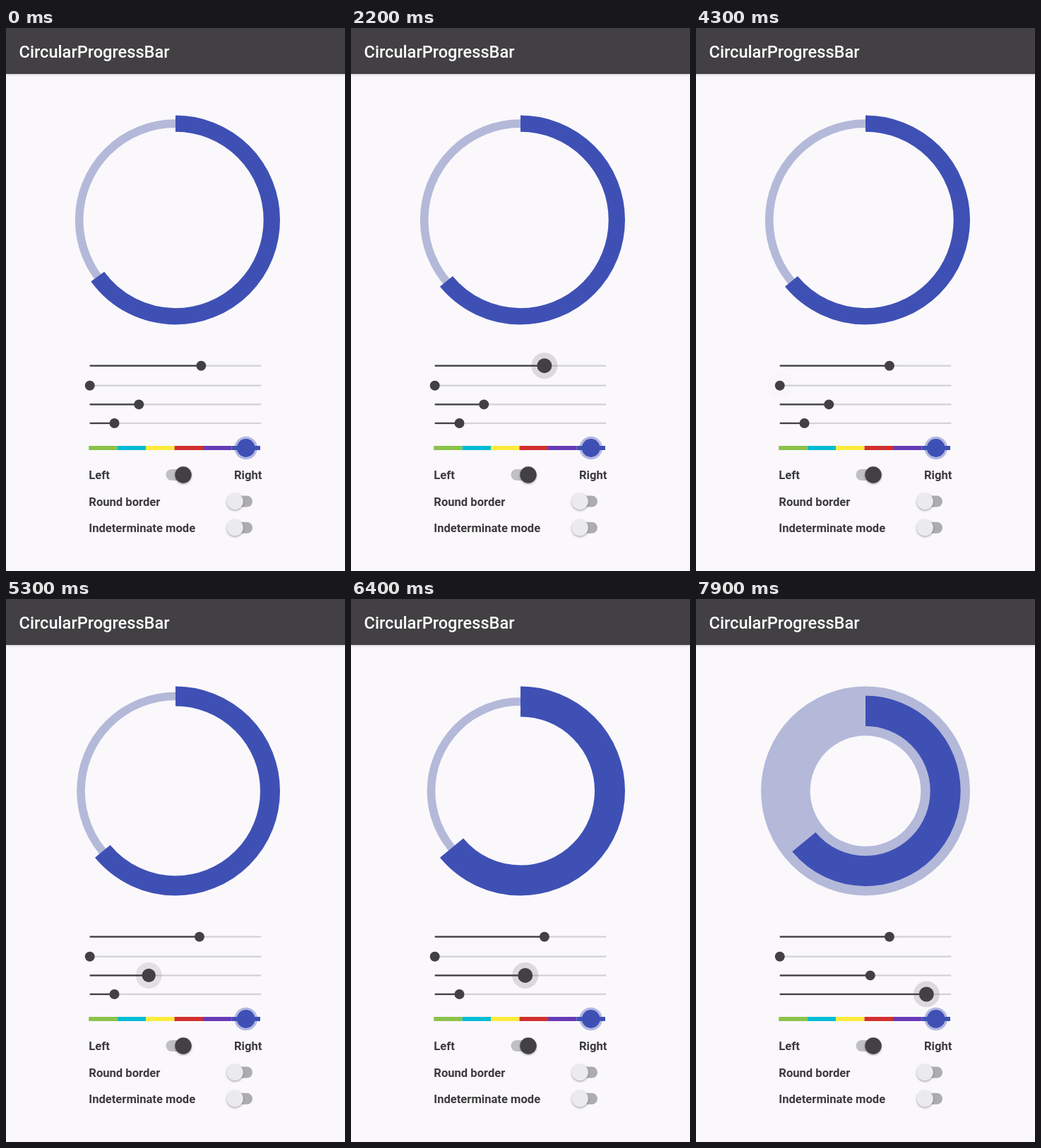
These frames come from a looping animation (480x768 px, 8 s). An HTML page with a canvas:

```html
<!DOCTYPE html>
<html lang="en">
<head>
<meta charset="utf-8">
<title>CircularProgressBar</title>
<style>
  html, body { margin: 0; width: 100%; height: 100%; overflow: hidden; background: #faf8fb; }
  canvas { display: block; }
</style>
</head>
<body>
<canvas id="stage" width="480" height="768"></canvas>
<script>
const ctx = document.getElementById('stage').getContext('2d');
const LOOP = 8000, STEP = 100;
const DARK = '#424043', PAPER = '#faf8fb', BLUE = '#3f50b5', PALE = '#b4b9d9';
const RING = { x: 240, y: 271.5, r: 148 };
const MAX_STROKE = 81.4;
const TRACK = { left: 118.7, width: 242.5 };
const PALETTE = ['#8bc34a', '#00bcd4', '#ffeb3b', '#d32f2f', '#673ab7', BLUE];

// Each drag eases between a few [time, value] turning points.
const sliders = {
  progress: { y: 477.7, down: 900, up: 2300, drag: [[900, .65], [1450, .252], [2200, .64]] },
  start: { y: 505.7, down: 3000, up: 4300, drag: [[3000, 0], [3600, .445], [4100, 0]] },
  barWidth: { y: 532.4, down: 5100, up: 6600, drag: [[5100, .2866], [5900, .68], [6400, .528]] },
  trackWidth: { y: 559, down: 7200, up: LOOP, drag: [[7200, .1435], [7900, .856]] }
};

const ease = u => (1 - Math.cos(Math.PI * u)) / 2;

function valueAt({ drag }, t) {
  const next = drag.findIndex(point => point[0] > t);
  if (next === 0) return drag[0][1];
  if (next < 0) return drag[drag.length - 1][1];
  const [t0, a] = drag[next - 1], [t1, b] = drag[next];
  return a + (b - a) * ease((t - t0) / (t1 - t0));
}

function box(x, y, w, h, color) {
  ctx.fillStyle = color;
  ctx.fillRect(x, y, w, h);
}

function disc(x, y, r, color) {
  ctx.fillStyle = color;
  ctx.beginPath();
  ctx.arc(x, y, r, 0, 2 * Math.PI);
  ctx.fill();
}

function arc(from, turns, r, width, color) {
  const a = (from - .25) * 2 * Math.PI;
  ctx.strokeStyle = color;
  ctx.lineWidth = width;
  ctx.beginPath();
  ctx.arc(RING.x, RING.y, r, a, a + turns * 2 * Math.PI);
  ctx.stroke();
}

function label(text, x, y, font = 'bold 16.6px Roboto, sans-serif', color = '#3c3a3d') {
  ctx.font = font;
  ctx.fillStyle = color;
  ctx.fillText(text, x, y);
}

function withShadow(blur, offset, alpha, paint) {
  ctx.save();
  ctx.shadowColor = `rgba(0,0,0,${alpha})`;
  ctx.shadowBlur = blur;
  ctx.shadowOffsetY = offset;
  paint();
  ctx.restore();
}

function toggle(left, thumbX, y, trackColor, thumbColor) {
  ctx.fillStyle = trackColor;
  ctx.beginPath();
  ctx.roundRect(left, y - 8, 36, 16, 8);
  ctx.fill();
  withShadow(3, 1.2, .35, () => disc(thumbX, y, 11.7, thumbColor));
}

function drawSlider(slider, t) {
  const { y, down, up } = slider;
  const x = TRACK.left + valueAt(slider, t) * TRACK.width;
  const held = t >= down && t < up;
  const press = held ? Math.min(1, (t - down + STEP) / 400) : 0;
  const lingering = t >= up && t < up + 800;
  box(TRACK.left, y - 1.15, TRACK.width, 2.3, '#d3d2d6');
  box(TRACK.left, y - 1.15, x - TRACK.left, 2.3, DARK);
  disc(x, y, 18.5, `rgba(66,64,67,${lingering ? .012 : .17 * press})`);
  disc(x, y, 7 + 3.5 * press, DARK);
}

function drawRing(t) {
  const bar = valueAt(sliders.barWidth, t) * MAX_STROKE;
  const track = valueAt(sliders.trackWidth, t) * MAX_STROKE;
  const r = RING.r - Math.max(bar, track) / 2;
  arc(0, 1, r, track, PALE);
  arc(valueAt(sliders.start, t), valueAt(sliders.progress, t), r, bar, BLUE);
}

function drawColorPicker() {
  PALETTE.forEach((color, i) => box(117.2 + i * 40.45, 591, 40.5, 6, color));
  ctx.globalAlpha = .38;
  disc(339.7, 594, 16.3, BLUE);
  ctx.globalAlpha = 1;
  disc(339.7, 594, 12.9, BLUE);
}

function draw(t) {
  box(0, 0, 480, 768, PAPER);
  withShadow(3, 1, .2, () => box(0, 0, 480, 65, DARK));
  label('CircularProgressBar', 18.6, 42, '500 23.6px Roboto, sans-serif', '#fff');

  drawRing(t);
  Object.values(sliders).forEach(slider => drawSlider(slider, t));
  drawColorPicker();

  label('Left', 117.3, 638);
  label('Right', 323, 638);
  label('Round border', 117.3, 676);
  label('Indeterminate mode', 117.3, 713);
  toggle(226.5, 251, 632, '#c0bfc1', DARK);
  toggle(313, 324.2, 669.5, '#adacae', '#ebeaec');
  toggle(313, 324.2, 706.8, '#adacae', '#ebeaec');
}

function frame(now) {
  draw(Math.floor(now % LOOP / STEP) * STEP);
  requestAnimationFrame(frame);
}
requestAnimationFrame(frame);
</script>
</body>
</html>
```
